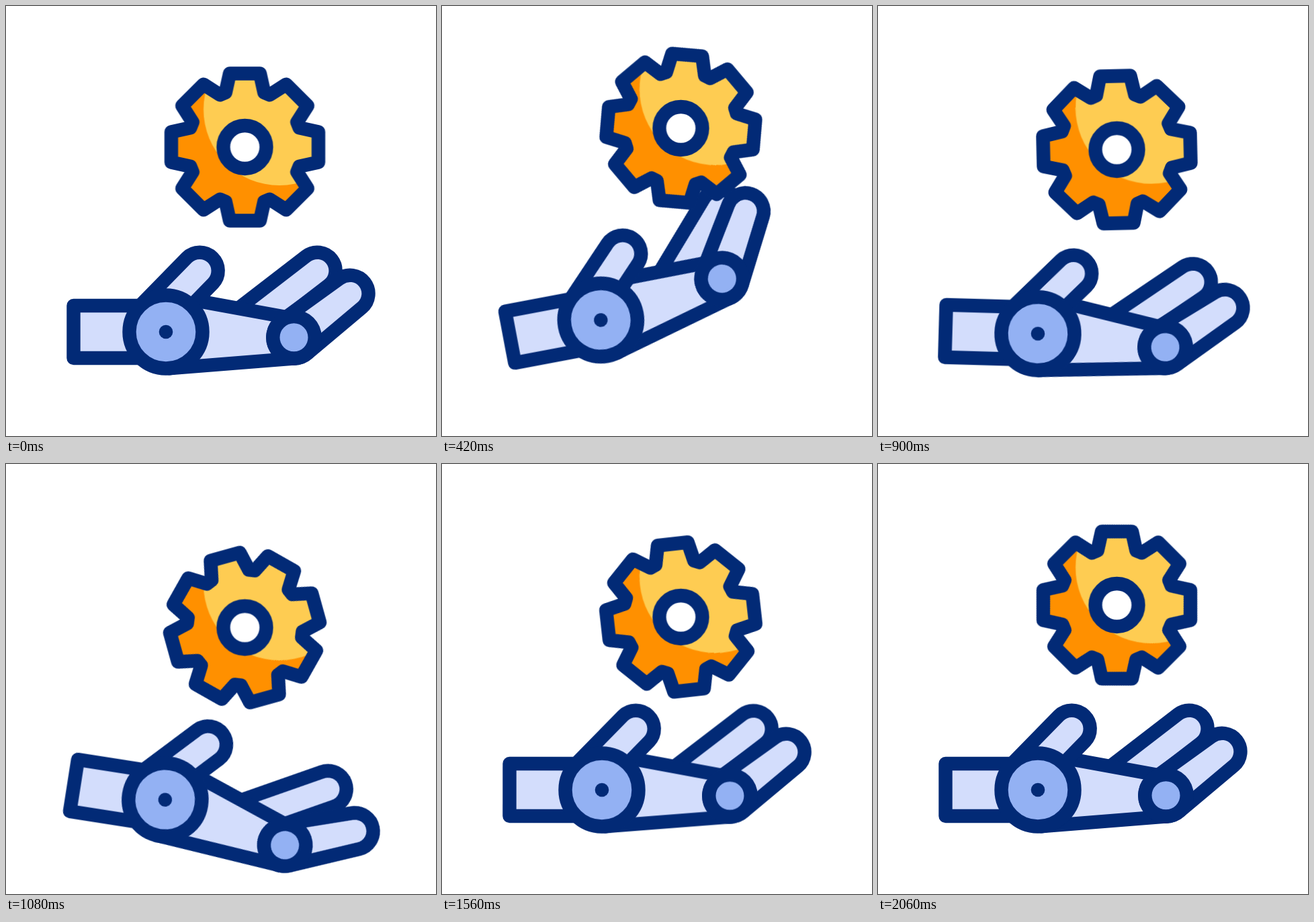
An HTML page for the animation above (2.1 s loop, 640 px wide and 640 px high).

```html
<!DOCTYPE html>
<html lang="en">
<head>
<meta charset="utf-8">
<title>Robot hand and gear</title>
<style>
  html, body { margin: 0; width: 100%; height: 100%; overflow: hidden; background: #fff; }
  svg { display: block; width: 100%; height: 100%; }

  .ink { stroke: #022a76; stroke-width: 20.4; stroke-linejoin: round; stroke-linecap: round; }
  .pale { fill: #d3ddfc; }
  .blue { fill: #93b1f3; }
  .dot { fill: #022a76; }

  .swing, .rise, .spin, .drift { animation: 2.1s infinite; }

  /* each joint adds its own swing to that of its parent */
  .swing { animation-name: swing; }
  .wrist { --up: -13.6deg; --down: 8.9deg; transform-origin: 143px 485px; }
  .palm { --up: -13.5deg; --down: 9.4deg; transform-origin: 238px 485px; }
  .finger { --up: -14.8deg; --down: 8.4deg; transform-origin: 428.5px 493.3px; }
  @keyframes swing {
    0% { transform: rotate(0deg); animation-timing-function: cubic-bezier(.167, 0, .85, 1); }
    26.667% { transform: rotate(var(--up)); animation-timing-function: cubic-bezier(.26, 0, .78, 1); }
    51.667% { transform: rotate(var(--down)); animation-timing-function: cubic-bezier(.25, 0, .75, 1); }
    75.238%, 100% { transform: rotate(0deg); }
  }

  .rise { animation-name: shift; --high: -40.5px; --low: 45px; }
  .drift { animation-name: shift; --high: -3px; --low: -9px; }
  @keyframes shift {
    0% { transform: translateY(0px); animation-timing-function: cubic-bezier(.3, 0, .9, 1); }
    27.619% { transform: translateY(var(--high)); animation-timing-function: cubic-bezier(.22, 0, .78, 1); }
    57.381% { transform: translateY(var(--low)); animation-timing-function: cubic-bezier(.25, 0, .75, 1); }
    86.667%, 100% { transform: translateY(0px); }
  }

  /* the gear has eight teeth, so 405deg looks like 0deg */
  .spin { animation-name: spin; --dir: 1; transform-origin: 0 0; }
  .back { --dir: -1; }
  @keyframes spin {
    0% { transform: rotate(0deg); animation-timing-function: cubic-bezier(.3, 0, .9, 1); }
    27.619% { transform: rotate(calc(var(--dir) * 72deg)); animation-timing-function: cubic-bezier(.25, 0, .78, 1); }
    57.381% { transform: rotate(calc(var(--dir) * 284deg)); animation-timing-function: cubic-bezier(.2, 0, .8, 1); }
    87.619%, 100% { transform: rotate(calc(var(--dir) * 405deg)); }
  }
</style>
</head>
<body>
<svg viewBox="0 0 640 640">
  <defs>
    <clipPath id="gearClip"><path class="gear"/></clipPath>
  </defs>

  <g class="swing wrist">
    <g class="swing palm">
      <path class="ink pale" data-limb="352 479.8 27.3 463.3 394 27.3"/>
      <path class="ink pale" d="M247 432L425 464.5L431 524.4L242.3 539.3Z"/>
      <g class="swing finger">
        <path class="ink pale" data-limb="428.5 493.3 31.2 512.2 428 27.3"/>
        <circle class="ink blue" cx="428.5" cy="493.3" r="31.2"/>
      </g>
    </g>
    <path class="ink pale" data-limb="222 462 27.3 288.7 393.7 27.3"/>
    <path class="ink pale" d="M100.5 446H215V524H100.5Z"/>
    <circle class="ink blue" cx="238" cy="485" r="54.5"/>
    <circle class="dot" cx="238" cy="485" r="10.3"/>
  </g>

  <g transform="translate(355.5 210)">
    <g class="rise">
      <g class="spin">
        <g clip-path="url(#gearClip)">
          <path class="gear" fill="#ff9000"/>
          <g class="spin back">
            <circle class="drift" cx="51.5" cy="-56" r="113" fill="#fecc52"/>
          </g>
        </g>
        <path class="gear ink" fill="none"/>
      </g>
      <circle class="ink" r="32" fill="#fff"/>
    </g>
  </g>
</svg>
<script>
  const at = (x, y, r, a) => `${(x + r * Math.cos(a)).toFixed(2)} ${(y + r * Math.sin(a)).toFixed(2)}`;

  // Outline around two circles joined by their outer tangents.
  function limb(x1, y1, r1, x2, y2, r2) {
    const a = Math.atan2(y2 - y1, x2 - x1);
    const k = Math.acos((r1 - r2) / Math.hypot(x2 - x1, y2 - y1));
    return `M${at(x1, y1, r1, a - k)}L${at(x2, y2, r2, a - k)}` +
      `A${r2} ${r2} 0 0 1 ${at(x2, y2, r2, a + k)}` +
      `L${at(x1, y1, r1, a + k)}A${r1} ${r1} 0 1 1 ${at(x1, y1, r1, a - k)}Z`;
  }

  // Each tooth has two tip corners, each valley a short flat floor.
  function gear(teeth) {
    const points = [];
    const add = (side, out, turn) =>
      points.push(at(0, 0, Math.hypot(side, out), Math.atan2(-out, side) + turn));
    for (let i = 0; i < teeth; i++) {
      const turn = i * 2 * Math.PI / teeth;
      const valley = turn + Math.PI / teeth;
      add(-22.5, 109.5, turn);
      add(22.5, 109.5, turn);
      add(-4.5, 86, valley);
      add(4.5, 86, valley);
    }
    return `M${points.join("L")}Z`;
  }

  for (const el of document.querySelectorAll("[data-limb]"))
    el.setAttribute("d", limb(...el.dataset.limb.split(" ").map(Number)));
  for (const el of document.querySelectorAll(".gear"))
    el.setAttribute("d", gear(8));
</script>
</body>
</html>
```
